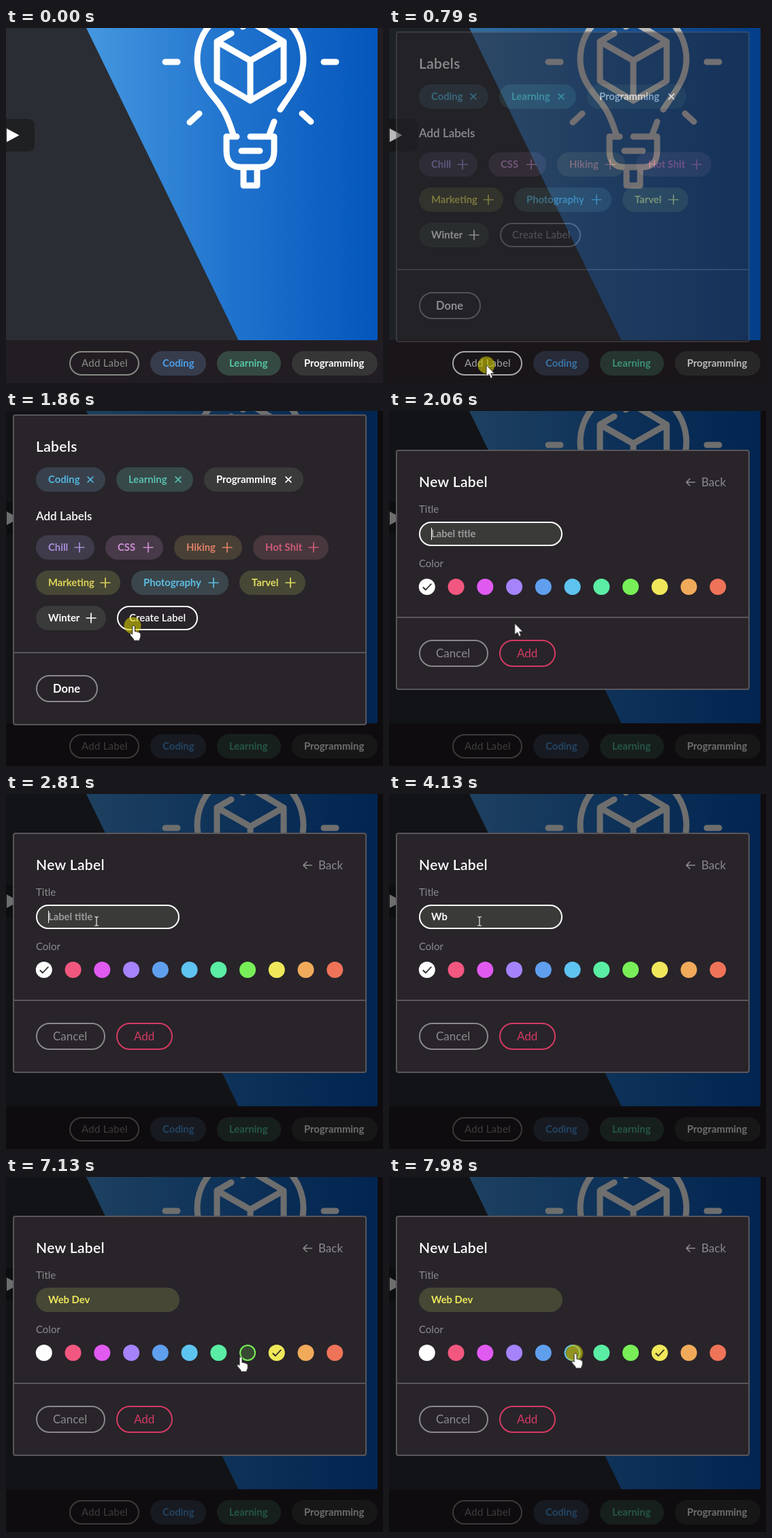
These frames come from a looping animation (554x523 px, 8000 ms). An HTML page:

```html
<!DOCTYPE html>
<html lang="en">
<head>
<meta charset="utf-8">
<title>Label picker</title>
<style>
  html, body { margin: 0; width: 100%; height: 100%; overflow: hidden; background: #221d22; }
  svg { position: absolute; left: 0; top: 0; width: 554px; height: 523px; }
  text, .field { font-family: Lato, "Open Sans", sans-serif; font-size: 15px; }
  text { white-space: pre; }
  .b { font-weight: 700; font-size: 14.8px; }
  .thin { letter-spacing: .25px; }
  .head { font-size: 21px; font-weight: 600; letter-spacing: .35px; fill: #fff; }
  .btn { font-size: 17px; }
  .grey { fill: #8d8a8e; }
  .line { fill: none; stroke-width: 2; }
  .ink { fill: none; stroke: #fff; stroke-width: 9; stroke-linecap: round; stroke-linejoin: round; }

  /* every animation shares one 8 s clock */
  .dim, .list, .form, .flag, .rim, .word, #cursor, .typed::before, .field { animation: 8s linear infinite both; }
  .flag, .form, .typed::before, .field { animation-timing-function: step-end; }

  .dim { animation-name: dim; }
  @keyframes dim { 0%, 9.4% { opacity: 0 } 10.4%, 100% { opacity: 1 } }
  .list { animation-name: list; }
  @keyframes list { 0%, 9.4% { opacity: 0 } 10.4%, 24.86% { opacity: 1 } 24.87%, 100% { opacity: 0 } }
  .form { animation-name: form; }
  @keyframes form { 0% { opacity: 0 } 24.87%, 100% { opacity: 1 } }

  .open.rim { animation-name: openRim; }
  @keyframes openRim { 0%, 2.6% { stroke: #868a82 } 3.8%, 9.4% { stroke: #fff } 10.6% { stroke: #c4c4c4 } 12.5%, 100% { stroke: #868a82 } }
  .open.word { animation-name: openWord; }
  @keyframes openWord { 0%, 2.6% { fill: #8c8e89 } 3.8%, 9.4% { fill: #fff } 10.6% { fill: #b4b4b4 } 12.5%, 100% { fill: #8c8e89 } }
  .make.rim { animation-name: makeRim; }
  @keyframes makeRim { 0%, 19.4% { stroke: #7f7c80 } 20.7%, 100% { stroke: #fff } }
  .make.word { animation-name: makeWord; }
  @keyframes makeWord {
    0%, 19.4% { fill: #8d8a8e; font-weight: 400; letter-spacing: .25px }
    20.7%, 100% { fill: #fff; font-weight: 600; letter-spacing: 0 }
  }

  .before { animation-name: before; }
  @keyframes before { 0% { opacity: 1 } 87.8%, 100% { opacity: 0 } }
  .after { animation-name: after; }
  @keyframes after { 0% { opacity: 0 } 87.8%, 100% { opacity: 1 } }
  .hover8 { animation-name: hover8; }
  @keyframes hover8 { 0% { opacity: 0 } 83.2% { opacity: 1 } 87.8%, 100% { opacity: 0 } }
  .hover7 { animation-name: hover7; }
  @keyframes hover7 { 0% { opacity: 0 } 88.7% { opacity: 1 } 90.2%, 100% { opacity: 0 } }
  .hover6 { animation-name: hover6; }
  @keyframes hover6 { 0% { opacity: 0 } 90.8% { opacity: 1 } 92.6%, 100% { opacity: 0 } }
  .hover5 { animation-name: hover5; }
  @keyframes hover5 { 0% { opacity: 0 } 94.2%, 100% { opacity: 1 } }

  .field { position: absolute; left: 62px; top: 172px; height: 18px; line-height: 17px; white-space: pre; font-size: 14.8px; font-weight: 700; }
  .typed { color: #fff; }
  .typed.after { color: #ebe65c; }
  .typed::before { content: ""; animation-name: typing; }
  @keyframes typing {
    0% { content: "" } 44.2% { content: "Wb" } 56.6% { content: "W" } 58.2% { content: "We" }
    61.45% { content: "Web" } 63.2% { content: "Web " } 65.7% { content: "Web D" }
    68.1% { content: "Web De" } 69.8%, 100% { content: "Web Dev" }
  }
  .hint { color: #9b9b9b; animation-name: hint; }
  @keyframes hint { 0% { opacity: 0 } 24.87% { opacity: 1 } 44.2%, 100% { opacity: 0 } }
  .caret { position: absolute; top: 0; width: 1px; height: 18px; background: #fff; animation-name: blink; }
  @keyframes blink {
    0% { opacity: 0 } 24.87% { opacity: 1 } 28.4% { opacity: 0 } 34.6% { opacity: 1 } 40.85% { opacity: 0 }
    44.2% { opacity: 1 } 51.6% { opacity: 0 } 56.6% { opacity: 1 } 76.1% { opacity: 0 } 82.4% { opacity: 1 }
    87.8%, 100% { opacity: 0 }
  }

  #cursor { animation-name: move; }
  @keyframes move {
    0%, 1.4% { transform: translate(152px, 526px) }
    4.1%, 11.6% { transform: translate(143px, 496.5px); animation-timing-function: ease-in-out }
    19% { transform: translate(189px, 320px) }
    20.7%, 24.87% { transform: translate(186px, 316px); animation-timing-function: ease-in-out }
    32.5% { transform: translate(137px, 192px) }
    35.1%, 75.5% { transform: translate(133px, 187px) }
    77.5% { transform: translate(190px, 162px) }
    80.5% { transform: translate(335px, 205px) }
    82.5% { transform: translate(414px, 249px) }
    84%, 88.1% { transform: translate(398px, 252px) }
    89%, 90% { transform: translate(343.5px, 264.5px); animation-timing-function: ease-out }
    95.6%, 100% { transform: translate(272.5px, 259.5px) }
  }
  .arrow { animation-name: arrow; }
  @keyframes arrow {
    0% { opacity: 1 } 2.6% { opacity: 0 } 9.8% { opacity: 1 } 19.3% { opacity: 0 }
    24.87% { opacity: 1 } 31.6% { opacity: 0 } 76.9% { opacity: 1 } 83%, 100% { opacity: 0 }
  }
  .hand { animation-name: hand; }
  @keyframes hand {
    0% { opacity: 0 } 2.6% { opacity: 1 } 9.8% { opacity: 0 } 19.3% { opacity: 1 }
    24.87% { opacity: 0 } 83%, 100% { opacity: 1 }
  }
  .beam { animation-name: beam; }
  @keyframes beam { 0% { opacity: 0 } 31.6% { opacity: 1 } 76.9%, 100% { opacity: 0 } }
  .click { animation-name: click; }
  @keyframes click {
    0% { opacity: 0 } 9% { opacity: 1 } 9.9% { opacity: 0 } 23.2% { opacity: 1 } 24.87% { opacity: 0 }
    87.3% { opacity: 1 } 88.2% { opacity: 0 } 98.1%, 100% { opacity: 1 }
  }
</style>
</head>
<body>
<svg viewBox="0 0 554 523">
  <defs>
    <linearGradient id="sky" gradientUnits="userSpaceOnUse" x1="118" x2="546" y1="0" y2="0">
      <stop offset="0" stop-color="#4597df"/>
      <stop offset=".5" stop-color="#2073cd"/>
      <stop offset="1" stop-color="#0456bc"/>
    </linearGradient>
  </defs>
  <path d="M0 0H546V458Q546 460 544 460H0Z" fill="#2a2d33"/>
  <path d="M118 0H546V458Q546 460 544 460H341.500Z" fill="url(#sky)"/>
  <rect x="-30" y="134" width="72" height="48" rx="9" fill="#1f2022"/>
  <path d="M1 148L19.500 158L1 168Z" fill="#fff"/>
  <g class="ink">
    <path d="M334 157C326 132 321 121 307 104C290 84 281 68 281 46A78 78 0 0 1 437 46C437 68 428 84 411 108L403 120M394 138L387 157"/>
    <path d="M331 8L310 20V78L359 107L408 78V20L359 -9L348 -2M310 20L359 48L408 20M359 48V107"/>
    <path d="M339 160H324V181Q324 205 346 205H372Q394 205 394 181V160H359M346 181H373"/>
    <path d="M349 208V232H369V208" stroke-linecap="butt"/>
    <path d="M234 50H252M467 50H485M270 139L284 126M435 126L448 138"/>
  </g>
  <g id="bar"></g>
  <rect class="dim" width="554" height="523" fill="#000" fill-opacity=".57"/>

  <g class="list">
    <rect x="11" y="6" width="518" height="456" rx="3" fill="#28242a" stroke="#59565a" stroke-width="2"/>
    <path d="M11 356H529" stroke="#59565a" stroke-width="2"/>
    <text class="head" x="44" y="60">Labels</text>
    <text x="44" y="161" fill="#fff" font-weight="600" style="font-size:17px">Add Labels</text>
    <g id="chosen"></g>
    <rect class="line" x="45" y="390" width="89" height="38" rx="19" stroke="#8a888b"/>
    <text class="btn" x="69" y="415" fill="#fff" font-weight="700" style="font-size:16.500px">Done</text>
  </g>

  <g class="form">
    <rect x="11" y="58" width="518" height="352" rx="3" fill="#28242a" stroke="#59565a" stroke-width="2"/>
    <path d="M11 304H529" stroke="#59565a" stroke-width="2"/>
    <text class="head" x="44" y="112">New Label</text>
    <path class="line" d="M450 105H437M442.500 99.500L437 105L442.500 110.500" stroke="#8d8a8e" style="stroke-width:1.600"/>
    <text class="btn grey" x="459" y="111">Back</text>
    <text class="grey" x="44" y="150">Title</text>
    <text class="grey" x="44" y="230">Color</text>
    <rect class="flag before" x="45" y="164" width="209" height="34" rx="17" fill="#3a3b39" stroke="#fff" stroke-width="2"/>
    <rect class="flag after" x="44" y="163" width="211" height="36" rx="18" fill="#464735"/>
    <g id="colors"></g>
    <rect class="line" x="45" y="338" width="100" height="38" rx="19" stroke="#8a888b"/>
    <text class="btn grey" x="69" y="363">Cancel</text>
    <rect class="line" x="163" y="338" width="81" height="38" rx="19" stroke="#d63a62"/>
    <text class="btn" x="188" y="363" fill="#d63a62">Add</text>
  </g>
</svg>

<div class="field hint">Label title</div>
<div class="field flag typed before"><i class="flag caret"></i></div>
<div class="field flag typed after"></div>

<svg viewBox="0 0 554 523">
  <g id="cursor">
    <circle class="flag click" r="12.500" fill="#d2cb00" fill-opacity=".6"/>
    <path class="flag arrow" d="M0 0V17L4 13.500L6.500 19.500L9.300 18.300L6.800 12.500H12Z" fill="#fff" stroke="#111" stroke-width=".8"/>
    <path class="flag hand" transform="translate(0 -.7)" d="M-.5 3C-.5 .5 3.500 .5 3.500 3V9.500Q5.500 8.500 6.600 10.200Q8.800 9.200 9.600 11.200Q12 10.800 12 13.500V17Q12 19 10.500 20.500V23H1.500V21L-3.500 15Q-4.800 12.600 -3 12Q-1.600 12 -.5 13.800Z" fill="#fff" stroke="#111" stroke-width=".9"/>
    <path class="flag beam" d="M-3 -6H-1L0 -5L1 -6H3M0 -5V6M-3 7H-1L0 6L1 7H3" fill="none" stroke="#eee" stroke-width="1.200"/>
  </g>
</svg>

<script>
  const put = (id, html) => { document.getElementById(id).innerHTML = html; };

  // icon: half-size of the arms and their tilt
  const icons = { plus: [7.5, 0], cross: [6.2, 45] };

  function pill(name, x, right, cy, fill, color, icon) {
    let mark = '';
    if (icon) {
      const [r, turn] = icons[icon];
      mark = `<path transform="translate(${right - 22} ${cy}) rotate(${turn})" d="M${-r} 0H${r}M0 ${-r}V${r}" stroke="${color}" stroke-width="1.7"/>`;
    }
    return `<rect x="${x}" y="${cy - 18}" width="${right - x}" height="36" rx="18" fill="${fill}"/>
      <text class="b" x="${x + 18}" y="${cy + 5}" fill="${color}">${name}</text>${mark}`;
  }

  const outline = (name, kind, x, right, cy) =>
    `<rect class="line rim ${kind}" x="${x + 1}" y="${cy - 17}" width="${right - x - 2}" height="34" rx="17"/>
     <text class="thin word ${kind}" x="${x + 18}" y="${cy + 5}">${name}</text>`;

  put('bar',
    outline('Add Label', 'open', 93, 196, 494) +
    pill('Coding', 212, 294, 494, '#373c4d', '#4d9fe6') +
    pill('Learning', 310, 404, 494, '#354943', '#55c6a4') +
    pill('Programming', 420, 546, 494, '#363636', '#fff'));

  put('chosen', [
    ['Coding', 44, 146, 101, '#38404c', '#53b3dc', 'cross'],
    ['Learning', 162, 275, 101, '#374948', '#5abfae', 'cross'],
    ['Programming', 291, 437, 101, '#393a39', '#fff', 'cross'],
    ['Chill', 44, 130, 201, '#403b4a', '#a48fdc', 'plus'],
    ['CSS', 146, 231, 201, '#483a49', '#cd8fd3', 'plus'],
    ['Hiking', 247, 347, 201, '#484035', '#e0806a', 'plus'],
    ['Hot Shit', 363, 474, 201, '#48373d', '#cf5c78', 'plus'],
    ['Marketing', 44, 168, 253, '#474735', '#dcd35a', 'plus'],
    ['Photography', 184, 327, 253, '#3a464b', '#5fbde2', 'plus'],
    ['Tarvel', 343, 440, 253, '#474735', '#e0dc60', 'plus'],
    ['Winter', 44, 147, 305, '#393a39', '#fff', 'plus']
  ].map(p => pill(...p)).join('') + outline('Create Label', 'make', 163, 282, 305));

  const colors = ['#fff', '#f2577f', '#e05af0', '#a583fb', '#5f9fee', '#5fc3f0',
    '#5beda4', '#78ef58', '#f0e85a', '#f0aa5a', '#ee7359'];
  const swatchX = i => 55.8 + i * 42.75;
  const tick = (i, state) =>
    `<path class="flag ${state}" transform="translate(${swatchX(i)} 259)" d="M-6 .5L-2 4.500L6.500 -4.500" fill="none" stroke="#242124" stroke-width="1.8"/>`;

  put('colors', colors.map((c, i) =>
    `<circle cx="${swatchX(i)}" cy="259" r="12" fill="${c}"/>` +
    (i > 4 && i < 9 ? `<circle class="flag hover${i}" cx="${swatchX(i)}" cy="259" r="10" fill="#28242a" fill-opacity=".82"/>` : '')
  ).join('') + tick(0, 'before') + tick(8, 'after'));
</script>
</body>
</html>
```
